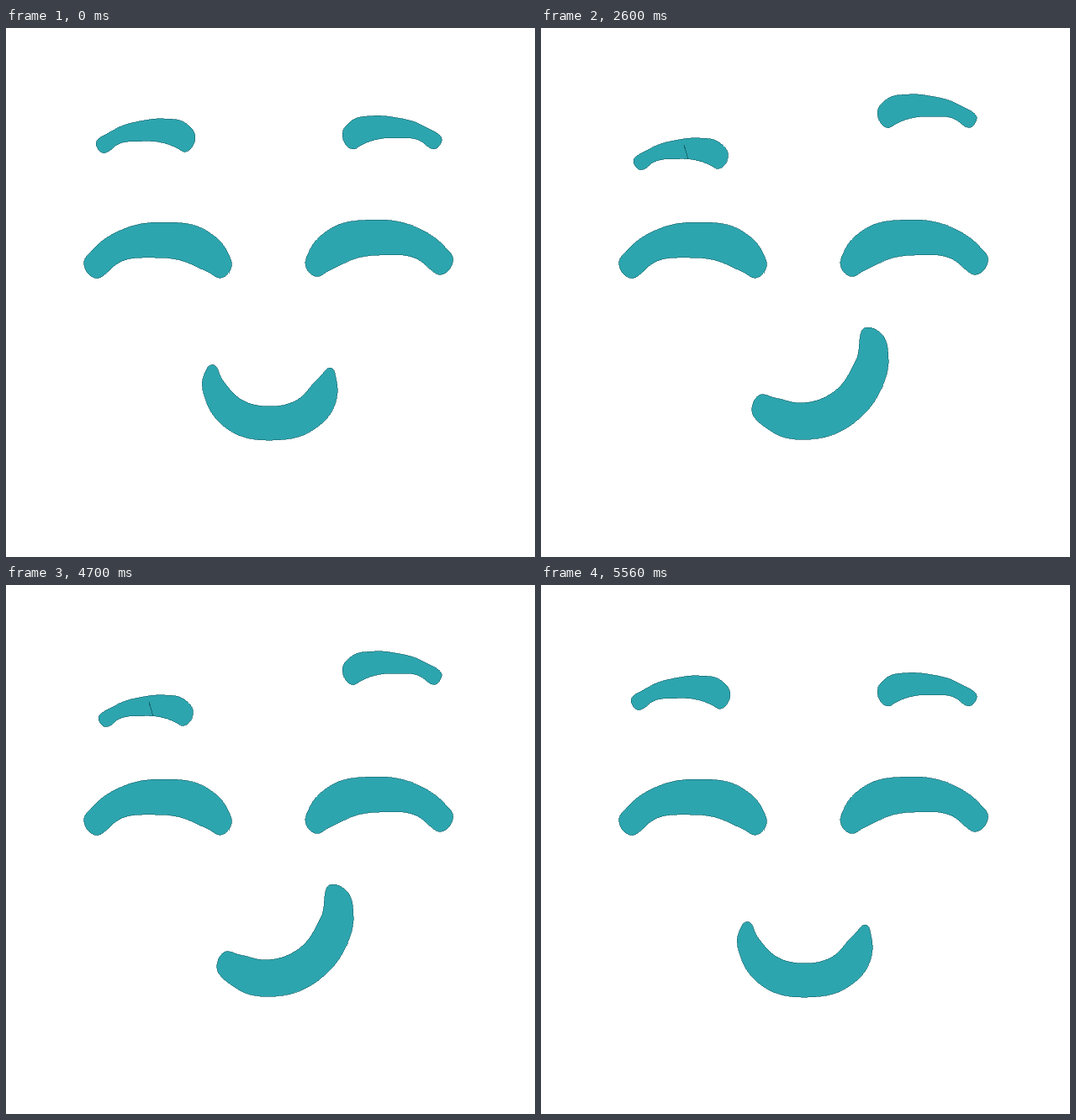
An HTML page that plays this animation: 629 by 629 pixels, repeating every 6 s.

```html
<!DOCTYPE html>
<html lang="en">
<head>
<meta charset="utf-8">
<title>Smirk</title>
<style>
  html, body { margin: 0; width: 100%; height: 100%; overflow: hidden; background: #fff; }
  svg { display: block; width: 100vw; height: 100vh; shape-rendering: crispEdges; }
  .skin { fill: #2da5ae; stroke: #1a6c74; stroke-width: .7; }
  .skin path { vector-effect: non-scaling-stroke; }
  .seam { fill: none; stroke: #14646b; }
</style>
</head>
<body>
<svg viewBox="0 0 629 629">
  <g class="skin">
    <path id="eyeL"/>
    <path id="eyeR" transform="rotate(-1 444 262) translate(624 -3) scale(-1 1)"/>
    <g id="right"><path id="browR" transform="rotate(-1 410 125) translate(625 -3) scale(-1 1)"/></g>
    <g id="left"><path id="browL"/></g>
    <path id="mouth"/>
  </g>
  <path id="seam" class="seam" d="M170 139L175 156"/>
</svg>
<script>
// Key points along each outline
const eye = '93,277 101,266 140,239 188,231 240,242 264,268 268,284 256,297 240,290 205,275.5 177,273 131,281 121,290 109,297.5';
const brow = '107.5,140 127,122 161,110.5 188,108 214,113.5 225,129 211,147 204,143 182,135.5 162,134.5 130,140 123,146 116,148.5';
const smile = '235,414 245,400.5 257,418 280,442 312,450 345,443 373,415 387,404.5 392.5,418 391,448 365,478 317,490 265,478 238,444';
const tilt = '236,438 249,421.5 264,432 312,450 360,431 386,393 391,367 403,369 409.5,402 380,470 317,494.5 265,481 241,460';
const grin = '251,451 259,437 279,440 309,446 349,432 375,394 389,356 403,362 413,394 404,430 380,463 321,489 273,479';
const smirk = '285,460 292,449 314,450 353,433 377,399 396,362 403,351 415,373 414,406 394,448 350,482 327,487.5 294,478';

// Closed curve: each tangent follows the circle through a point and its neighbours
function blob(text) {
  const pts = text.split(' ').map(p => p.split(',').map(Number));
  const n = pts.length;
  const edges = pts.map(([x, y], i) => {
    const [nx, ny] = pts[(i + 1) % n];
    const len = Math.hypot(nx - x, ny - y);
    return { len, angle: Math.atan2(ny - y, nx - x) };
  });
  const tangents = edges.map((b, i) => {
    const a = edges[(i + n - 1) % n];
    const x = Math.cos(a.angle) * b.len + Math.cos(b.angle) * a.len;
    const y = Math.sin(a.angle) * b.len + Math.sin(b.angle) * a.len;
    const size = Math.hypot(x, y);
    return [x / size, y / size];
  });
  const curves = pts.map((p, i) => {
    const j = (i + 1) % n, reach = edges[i].len * .36;
    const c1 = p.map((v, k) => v + tangents[i][k] * reach);
    const c2 = pts[j].map((v, k) => v - tangents[j][k] * reach);
    return `C${c1} ${c2} ${pts[j]}`;
  });
  return `M${pts[0]}${curves.join('')}Z`;
}

const poses = [
  { mouth: blob(smile), right: [0, 0] },
  { mouth: blob(tilt), right: [-1, -13] },
  { mouth: blob(grin), right: [0, -25.5] },
  { mouth: blob(smirk), right: [-2, -41] }
];
const loop = 6000, rise = 2500, fall = 4700, step = 100;

const set = (id, name, value) => document.getElementById(id).setAttribute(name, value);

for (const id of ['eyeL', 'eyeR']) set(id, 'd', blob(eye));
for (const id of ['browL', 'browR']) set(id, 'd', blob(brow));

// Steps taken since a moment, from 0 to the last pose
function climbed(t, from) {
  return Math.max(0, Math.min(poses.length - 1, Math.floor((t - from) / step) + 1));
}

function show(level) {
  const { mouth, right } = poses[level];
  const drop = `translate(${level === 1 ? -1.5 : 0} ${12.5 * (level - 2)})`;
  set('mouth', 'd', mouth);
  set('right', 'transform', `translate(${right})`);
  // The lowered brow is slightly smaller and split by a seam
  set('left', 'transform', level ? `${drop} translate(8 30.5) scale(.953 .93)` : '');
  set('seam', 'transform', drop);
  set('seam', 'visibility', level ? 'visible' : 'hidden');
}

const start = performance.now();
function tick() {
  const t = (performance.now() - start) % loop;
  show(climbed(t, rise) - climbed(t, fall));
  requestAnimationFrame(tick);
}
tick();
</script>
</body>
</html>
```
